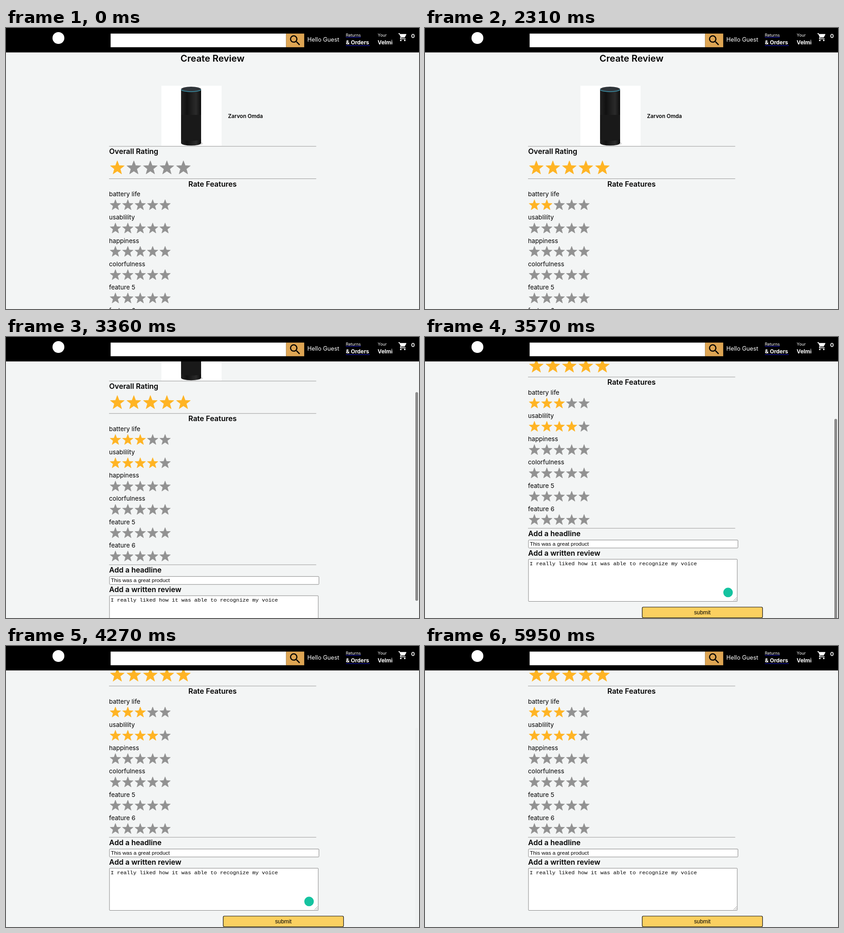
These frames come from a looping animation (906 px wide and 618 px high, 6020 ms). An HTML page:

```html
<!DOCTYPE html>
<html lang="en">
<head>
<meta charset="utf-8">
<title>Create Review</title>
<style>
  html, body { margin: 0; width: 100%; height: 100%; overflow: hidden; background: #f3f5f5; }
  svg { display: block; width: 906px; height: 618px; font: 13.6px Inter, sans-serif; }
  .title { font-weight: 600; font-size: 20.2px; }
  .head { font-weight: 600; font-size: 16px; }
  .product { font-weight: 600; font-size: 11.7px; }
  .field { font: 11.8px "Liberation Sans", sans-serif; }
  .mono { font: 11.77px "Liberation Mono", monospace; }
  .button { font: 12.3px "Liberation Sans", sans-serif; }
  .hello { font-size: 12.8px; }
  .small { font-size: 9px; }
  .bold { font-weight: 700; font-size: 12px; }
  .box { fill: #fff; stroke: #858585; }
  .star { fill: #929292; stroke: #929292; stroke-width: .8; stroke-linejoin: round; }
  .star.on { fill: #ffb424; stroke: #ffb424; }
</style>
</head>
<body>
<svg viewBox="0 0 906 618">
  <defs>
    <linearGradient id="shell">
      <stop offset="0" stop-color="#222"/>
      <stop offset=".3" stop-color="#111"/>
      <stop offset=".75" stop-color="#2b2b2b"/>
      <stop offset="1" stop-color="#0c0c0c"/>
    </linearGradient>
  </defs>
  <g id="page"></g>
  <g id="header"></g>
  <rect id="thumb" x="898" width="6" height="459" rx="3" fill="#8b8b8b"/>
</svg>
<script>
const LOOP = 6020, STEP = 70, MAX_SCROLL = 243.5, ROW = 51.25;
const $ = id => document.getElementById(id);
const clamp = (v, lo, hi) => Math.min(hi, Math.max(lo, v));

const text = (x, y, str, cls = '', extra = '') =>
  `<text x="${x}" y="${y}" class="${cls}" ${extra}>${str}</text>`;
const rect = (x, y, w, h, attrs) =>
  `<rect x="${x}" y="${y}" width="${w}" height="${h}" ${attrs}/>`;
const rule = y => rect(226, y, 454.5, 1, 'fill="#999"');

function star(cx, cy, r) {
  const points = Array.from({ length: 10 }, (_, i) => {
    const a = i * Math.PI / 5, d = i % 2 ? r * .42 : r;
    return (cx + d * Math.sin(a)).toFixed(2) + ',' + (cy - d * Math.cos(a)).toFixed(2);
  });
  return `<polygon class="star" points="${points.join(' ')}"/>`;
}
const stars = (id, x, y, gap, r) =>
  `<g id="${id}">${[0, 1, 2, 3, 4].map(i => star(x + i * gap, y, r)).join('')}</g>`;

const speaker = `
  ${rect(341, 127, 132, 132, 'fill="#fff"')}
  <ellipse cx="408" cy="254" rx="24" ry="5" fill="#ddd"/>
  <path d="M384 135V253a22 5.5 0 0 0 44 0V135z" fill="url(#shell)"/>
  <path d="M384 191H428V244a22 4 0 0 1-44 0z" fill="#191919"/>
  <ellipse cx="406" cy="135" rx="22" ry="6" fill="#30353a"/>
  <path d="M384.5 135a21.5 5 0 0 0 43 0" fill="none" stroke="#3a93ab" stroke-width="1.5"/>`;

const features = ['battery life', 'usablility', 'happiness', 'colorfulness', 'feature 5', 'feature 6'];

$('page').innerHTML = [
  text(453, 74, 'Create Review', 'title', 'text-anchor="middle"'),
  speaker,
  text(487, 198, 'Zarvon Omda', 'product'),
  rule(259.7),
  text(226.3, 277, 'Overall Rating', 'head'),
  stars('overall', 244.2, 308, 36.25, 16.1),
  rule(331),
  text(453, 348.8, 'Rate Features', 'head', 'text-anchor="middle"'),
  ...features.map((name, i) =>
    text(226, 370 + i * ROW, name) + stars('feature' + i, 240, 389.8 + i * ROW, 27.25, 12.3)),
  rule(663.7),
  text(226.3, 681.5, 'Add a headline', 'head'),
  rect(227, 690, 459.5, 17.5, 'rx="1.5" class="box"'),
  text(230, 702.8, 'This was a great product', 'field'),
  text(226.3, 724, 'Add a written review', 'head'),
  rect(227, 732.3, 458, 92.7, 'rx="1" class="box"'),
  text(229.5, 745.4, 'I really liked how it was able to recognize my voice', 'mono'),
  '<path d="M677 823.5l7-7M681 823.5l3-3" stroke="#777" stroke-width=".8"/>',
  '<circle id="helper" cx="664.8" cy="805.3" r="10.5" fill="#15c3a0"/>',
  rect(476.5, 837.5, 264, 23.5, 'rx="2.5" fill="#fbd060" stroke="#111" stroke-width="1.2"'),
  text(608.3, 853.6, 'submit', 'button', 'text-anchor="middle"')
].join('');

const searchIcon = 'M15.5 14h-.79l-.28-.27A6.471 6.471 0 0 0 16 9.5 6.5 6.5 0 1 0 9.5 16c1.61 0 3.09-.59 4.23-1.57l.27.28v.79l5 4.99L20.49 19l-4.99-5zm-6 0C7.01 14 5 11.99 5 9.5S7.01 5 9.5 5 14 7.01 14 9.5 11.99 14 9.5 14z';
const cartIcon = 'M7 18c-1.1 0-1.99.9-1.99 2S5.9 22 7 22s2-.9 2-2-.9-2-2-2zM1 2v2h2l3.6 7.59-1.35 2.45c-.16.28-.25.61-.25.96 0 1.1.9 2 2 2h12v-2H7.42c-.14 0-.25-.11-.25-.25l.03-.12.9-1.63h7.45c.75 0 1.41-.41 1.75-1.03l3.58-6.49A1 1 0 0 0 20 4H5.21l-.94-2H1zm16 16c-1.1 0-1.99.9-1.99 2s.89 2 1.99 2 2-.9 2-2-.9-2-2-2z';

$('header').innerHTML = `
  ${rect(0, 0, 906, 53.7, 'fill="#000"')}
  <circle cx="115" cy="22" r="13" fill="#fff"/>
  ${rect(229.5, 12.3, 385, 30, 'fill="#fff"')}
  ${rect(614.5, 12.3, 39.7, 30, 'fill="#dea553"')}
  <path d="${searchIcon}" transform="translate(619.2 12.2) scale(1.26)"/>
  <g fill="#fff">
    ${text(661, 30.3, 'Hello Guest', 'hello')}
    ${text(745.5, 18.7, 'Returns', 'small')}
    ${text(745.5, 36.3, '&amp; Orders', 'bold')}
    ${text(815.5, 18.7, 'Your', 'small')}
    ${text(815.2, 36.3, 'Velmi', 'bold')}
    ${text(888.8, 22.3, '0', 'bold')}
    <path d="${cartIcon}" transform="translate(860 9.8) scale(.87)"/>
  </g>
  <path d="M745.5 20.3h33M745.5 38.7h52.5" stroke="#1c1cd8"/>`;

// [time, scroll offset]: a flick past the end, then the rubber-band return
const scrollPath = [
  [3010, 0], [3080, 1], [3150, 15], [3220, 60], [3290, 115], [3360, 163.3], [3430, 202], [3500, 230],
  [3570, 243.5], [3640, 248], [3710, 247], [3780, 245.4], [3850, 244.5], [3920, 244], [3990, MAX_SCROLL]
];
function scrollAt(t) {
  const i = scrollPath.findIndex(p => p[0] > t);
  if (i === 0) return 0;
  if (i < 0) return MAX_SCROLL;
  const [t0, s0] = scrollPath[i - 1], [t1, s1] = scrollPath[i];
  return s0 + (s1 - s0) * (t - t0) / (t1 - t0);
}

// The pointer sweeps over the stars, lighting one every 140 ms
const swept = (t, start, lo, hi) => clamp(1 + Math.floor((t - start) / 140), lo, hi);
const rate = (id, count) =>
  [...$(id).children].forEach((s, i) => s.classList.toggle('on', i < count));

function draw(now) {
  const t = Math.floor(now % LOOP / STEP) * STEP;
  const scroll = scrollAt(t);
  rate('overall', swept(t, 700, 1, 5));
  rate('feature0', swept(t, 2100, 0, 3));
  rate('feature1', swept(t, 2520, 0, 4));
  $('page').setAttribute('transform', `translate(0 ${-scroll})`);
  $('header').setAttribute('transform', `translate(0 ${Math.min(0, MAX_SCROLL - scroll)})`);
  $('helper').setAttribute('opacity', t < 5110 ? 1 : 0);
  $('thumb').setAttribute('y', 1.5 + .733 * Math.min(scroll, MAX_SCROLL));
  $('thumb').setAttribute('opacity', t < 3150 ? 0 : clamp((4280 - t) / 210, 0, 1));
  requestAnimationFrame(draw);
}
draw(0);
</script>
</body>
</html>
```
